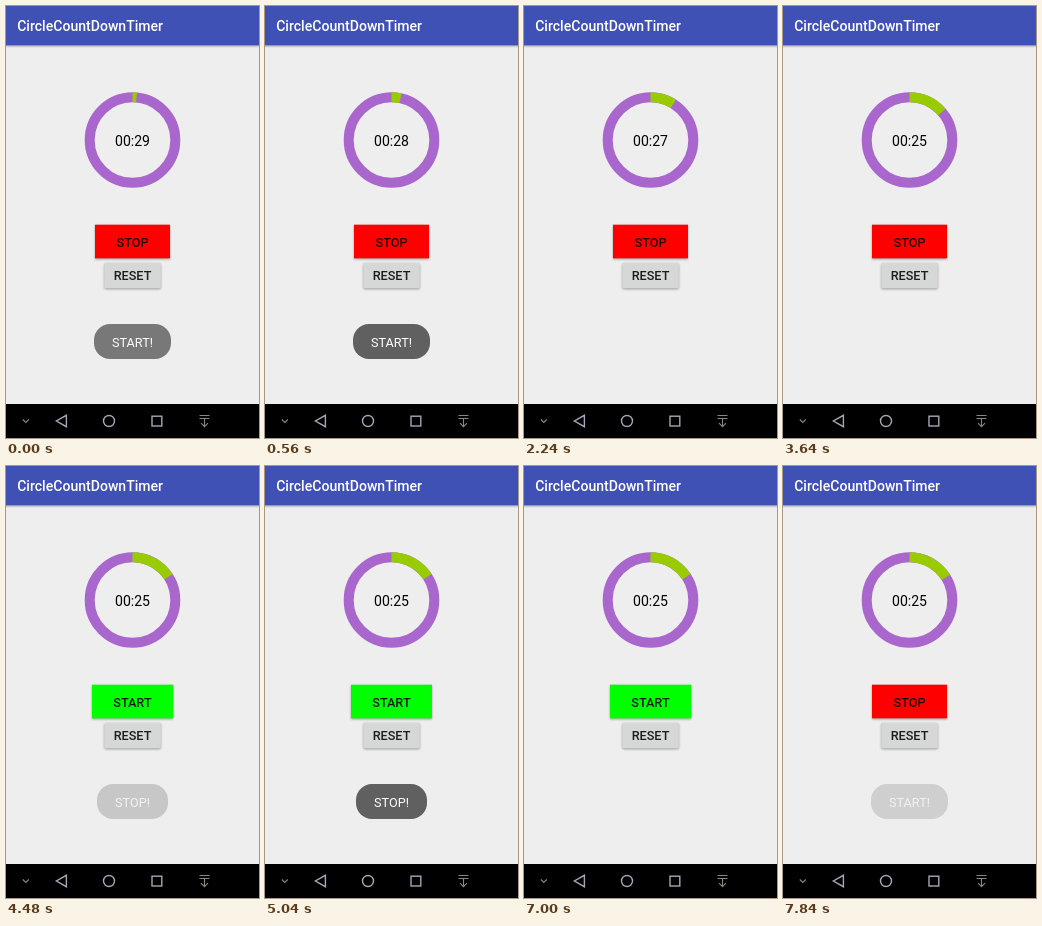
An HTML page for the animation above (8000 ms loop, 253x432 px).

```html
<!DOCTYPE html>
<html lang="en">
<head>
<meta charset="utf-8">
<title>Countdown timer</title>
<style>
html, body { margin: 0; width: 100%; height: 100%; overflow: hidden; background: #eee; }
svg { display: block; width: 100vw; height: 100vh; font-family: Roboto, sans-serif; }
.mid { text-anchor: middle; }
.label { font-size: 12.66px; font-weight: 500; fill: rgba(0, 0, 0, .87); }
.raised { filter: drop-shadow(0 1px .8px rgba(0, 0, 0, .35)); }
.nav { fill: none; stroke: #aaa4b4; stroke-width: 1.4; }
.nav .dim { stroke: #88887c; stroke-width: 1.1; }
</style>
</head>
<body>
<svg viewBox="0 0 253 432">
  <defs>
    <linearGradient id="shade" x2="0" y2="1">
      <stop stop-color="#000" stop-opacity=".28"/>
      <stop offset="1" stop-color="#000" stop-opacity="0"/>
    </linearGradient>
  </defs>
  <rect width="253" height="432" fill="#eee"/>
  <rect y="39" width="253" height="3" fill="url(#shade)"/>
  <rect width="253" height="39.3" fill="#3f51b5"/>
  <text x="11.2" y="25" font-size="14.06" font-weight="500" fill="#fff">CircleCountDownTimer</text>

  <g fill="none" stroke-width="10">
    <circle cx="126.5" cy="134" r="42.8" stroke="#a966cc"/>
    <path id="arc" stroke="#9c0"/>
  </g>
  <text id="clock" class="mid" x="126.5" y="139.5" font-size="14.06">00:29</text>

  <rect id="toggle" class="raised" y="218.7" height="33.6"/>
  <text id="action" class="mid label" x="126.5" y="240.5">STOP</text>
  <rect class="raised" x="98.4" y="256.7" width="56.4" height="25.5" rx="1.4" fill="#d6d7d7"/>
  <text class="mid label" x="126.5" y="274.2">RESET</text>

  <g id="toast">
    <rect id="pill" y="318" height="35" rx="16" fill="#606060"/>
    <text id="message" class="mid" x="126.5" y="341" font-size="12.66" fill="#fff">START!</text>
  </g>

  <rect y="398" width="253" height="34" fill="#000"/>
  <g class="nav">
    <path class="dim" d="M16.8 413.5l3 3 3-3"/>
    <path d="M60.4 409.3v11.4l-10-5.7z"/>
    <circle cx="103" cy="415" r="5.5"/>
    <rect x="146" y="410.2" width="9.8" height="9.8"/>
    <path class="dim" d="M193.5 409.5h10M193.5 412.5h10M198.5 412.5v8M195 417.2l3.5 3.5 3.5-3.5"/>
  </g>
</svg>
<script>
const LOOP = 8000, STEP = 280, FADE = 400, HOLD = 2020;
const PAUSE = 4300, RESUME = 7755, LEAD = 450, TOTAL = 30000;
const CX = 126.5, CY = 134, R = 42.8;
const toasts = [[-330, 'START!', 77], [4372, 'STOP!', 71], [RESUME, 'START!', 77]];
const $ = id => document.getElementById(id);
const clamp = v => Math.max(0, Math.min(1, v));

function setBox(el, width) {
  el.setAttribute('x', CX - width / 2);
  el.setAttribute('width', width);
}

function drawTimer(t) {
  const spent = LEAD + Math.min(t, PAUSE) + Math.max(0, t - RESUME);
  const a = spent / TOTAL * 2 * Math.PI;
  const x = CX + R * Math.sin(a), y = CY - R * Math.cos(a);
  $('arc').setAttribute('d', `M${CX} ${CY - R}A${R} ${R} 0 0 1 ${x} ${y}`);
  const left = Math.floor((TOTAL - spent) / 1000);
  $('clock').textContent = '00:' + String(left).padStart(2, '0');
}

function drawToggle(running) {
  setBox($('toggle'), running ? 75 : 81);
  $('toggle').setAttribute('fill', running ? '#f00' : '#0f0');
  $('action').textContent = running ? 'STOP' : 'START';
}

function drawToast(t) {
  const [born, text, width] = toasts.filter(item => item[0] <= t).pop();
  const age = t - born;
  $('toast').setAttribute('opacity', Math.min(clamp(age / FADE), clamp(1 - (age - HOLD) / FADE)));
  $('message').textContent = text;
  setBox($('pill'), width);
}

function frame() {
  // the screen refreshes only every STEP ms
  const t = Math.floor(performance.now() % LOOP / STEP) * STEP;
  drawTimer(t);
  drawToggle(t < PAUSE || t >= RESUME);
  drawToast(t);
  requestAnimationFrame(frame);
}
frame();
</script>
</body>
</html>
```
